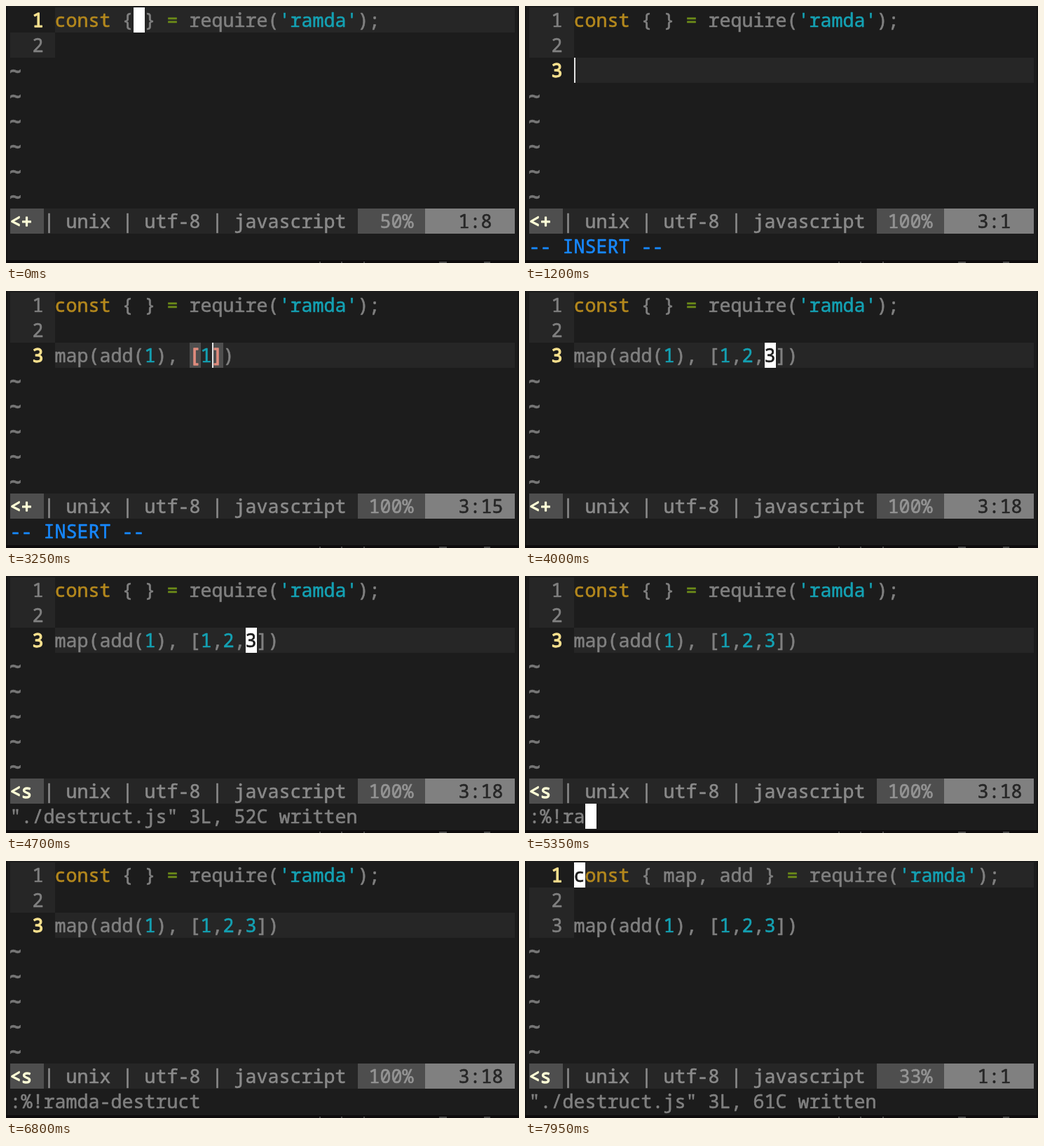
These frames come from a looping animation (732x368 px, 8000 ms). An HTML page with a canvas:

```html
<!DOCTYPE html>
<html lang="en">
<head>
<meta charset="utf-8">
<title>Editor session</title>
<style>
  html, body { margin: 0; width: 100%; height: 100%; overflow: hidden; background: #1c1c1c; }
  canvas { display: block; }
</style>
</head>
<body>
<canvas id="stage" width="732" height="368"></canvas>
<script>
const ctx = document.getElementById('stage').getContext('2d');
const LOOP = 8000;
const CW = 16, RH = 36, LEFT = 6, TOP = 2, COLS = 45, GUTTER = 4;
const FONT = '26.67px "Noto Sans Mono", "DejaVu Sans Mono", monospace';
const TILDE_FONT = 'bold 28px "DejaVu Sans Mono", monospace';
const REGULAR = 0.6, BOLD = 1.3;   // outline widths that thicken the glyphs

const C = {
  bg: '#1c1c1c', line: '#262626', text: '#808080', tilde: '#767676',
  keyword: '#b4881d', op: '#6b8a18', value: '#14a1b3',
  current: '#f7e08e', match: '#df8c7e', matchBg: '#4e4e4e',
  mode: '#ffffd7', panel: '#4e4e4e', panelText: '#949494',
  place: '#808080', insert: '#1787fb', white: '#ffffff'
};

// Key times in ms
const T = { down: 350, open: 700, esc: 4000, save: 4400, run: 6500, filtered: 7050, resave: 7750 };
const TYPED = 'map(add(1), [1,2,3';
const TYPED_AT = [1400, 1510, 1620, 1780, 1930, 2030, 2130, 2290, 2480,
                  2650, 2760, 2880, 3040, 3200, 3400, 3520, 3660, 3790];
const FILTER = ':%!ramda-destruct';
const FILTER_START = 5070, FILTER_STEP = 65;

const x = col => LEFT + col * CW;
const y = row => TOP + row * RH;

function box(col, row, cols, color) {
  ctx.fillStyle = color;
  ctx.fillRect(x(col), y(row), cols * CW, RH);
}

function put(str, col, row, color, weight = REGULAR, font = FONT) {
  ctx.font = font;
  ctx.fillStyle = ctx.strokeStyle = color;
  ctx.lineWidth = weight;
  [...str].forEach((ch, i) => {
    const cx = x(col + i) + CW / 2 - 0.5, base = y(row) + 28;
    ctx.fillText(ch, cx, base);
    ctx.strokeText(ch, cx, base);
  });
}

function putCode(str, row) {
  let col = GUTTER;
  for (const part of str.match(/const|'[^']*'|\d|=|[^\d='c]+|./g) || []) {
    const color = part === 'const' ? C.keyword
      : part === '=' ? C.op
      : /^['\d]/.test(part) ? C.value : C.text;
    put(part, col, row, color);
    col += part.length;
  }
}

// Auto-closed brackets still open after the typed text
function openBrackets(str) {
  const stack = [];
  [...str].forEach((ch, i) => {
    if ('(['.includes(ch)) stack.push(i);
    else if (')]'.includes(ch)) stack.pop();
  });
  return stack;
}

function stateAt(t) {
  const typed = TYPED.slice(0, TYPED_AT.filter(at => at <= t).length);
  const open = openBrackets(typed);
  const closers = open.map(i => typed[i] === '(' ? ')' : ']').reverse().join('');
  const done = t >= T.filtered;
  const s = {
    lines: [`const { ${done ? 'map, add ' : ''}} = require('ramda');`, ''],
    row: 0, col: 7, insert: t >= T.open && t < T.esc, match: [],
    saved: (t >= T.save && t < T.filtered) || t >= T.resave,
    message: '', command: false
  };
  if (t >= T.open) s.lines.push(typed + closers);
  if (t >= T.down) { s.row = 1; s.col = 0; }
  if (t >= T.open) { s.row = 2; s.col = typed.length - (t >= T.esc ? 1 : 0); }
  if (done) { s.row = 0; s.col = 0; }
  if (s.insert && open.length) s.match = [open[open.length - 1], typed.length];

  const prompt = str => { s.message = str; s.command = true; };
  if (s.insert) s.message = '-- INSERT --';
  else if (t >= T.resave) s.message = '"./destruct.js" 3L, 61C written';
  else if (t >= 7600) prompt(':w');
  else if (t >= 7450) prompt(':');
  else if (done) s.message = '3 lines filtered';
  else if (t >= FILTER_START) prompt(FILTER.slice(0, 1 + Math.floor((t - FILTER_START) / FILTER_STEP)));
  else if (t >= T.save) s.message = '"./destruct.js" 3L, 52C written';
  else if (t >= 4220) prompt(':w');
  else if (t >= 4120) prompt(':');
  s.running = t >= T.run && !done;
  return s;
}

function drawStatus(s) {
  const row = 8;
  box(0, row, COLS, C.line);
  box(0, row, 3, C.panel);
  box(31, row, 6, C.panel);
  box(37, row, 8, C.place);
  put(s.saved ? '<s' : '<+', 0, row, C.mode, BOLD);
  put('| unix | utf-8 | javascript', 3, row, '#8a8a8a');
  const percent = Math.floor((s.row + 1) / s.lines.length * 100) + '%';
  put(percent.padStart(4), 32, row, C.panelText);
  put(`${s.row + 1}:${s.col + 1}`, 40, row, C.line);
}

function drawCursor(s) {
  if (s.running) return;
  if (s.command) return box(s.message.length, 9, 1, C.white);
  const col = GUTTER + s.col;
  if (s.insert) {
    ctx.fillStyle = '#e4e4e4';
    ctx.fillRect(x(col), y(s.row), 2, RH);
  } else {
    box(col, s.row, 1, C.white);
    put(s.lines[s.row][s.col] || ' ', col, s.row, C.bg);
  }
}

function drawEdge() {
  ctx.fillStyle = '#141414';
  ctx.fillRect(0, 0, 2, 368);
  ctx.fillRect(730, 0, 2, 368);
  ctx.fillStyle = '#0e0c0d';
  ctx.fillRect(0, 364, 732, 4);
  ctx.fillStyle = '#4a4a4a';
  for (const [left, width] of [[447, 2], [478, 2], [510, 2], [618, 11], [682, 9]])
    ctx.fillRect(left, 366, width, 2);
}

function draw(t) {
  const s = stateAt(t);
  ctx.fillStyle = C.bg;
  ctx.fillRect(0, 0, 732, 368);
  for (let row = 0; row < 8; row++) {
    if (row >= s.lines.length) {
      put('~', 0, row, C.tilde, REGULAR, TILDE_FONT);
      continue;
    }
    const here = row === s.row;
    if (here) box(GUTTER, row, COLS - GUTTER, C.line);
    else box(0, row, GUTTER, C.line);
    put(String(row + 1), 2, row, here ? C.current : C.text, here ? BOLD : REGULAR);
    putCode(s.lines[row], row);
  }
  for (const i of s.match) {
    box(GUTTER + i, s.row, 1, C.matchBg);
    put(s.lines[s.row][i], GUTTER + i, s.row, C.match, BOLD);
  }
  drawStatus(s);
  put(s.message, 0, 9, s.insert ? C.insert : C.text);
  drawEdge();
  drawCursor(s);
}

ctx.textAlign = 'center';
ctx.lineJoin = 'round';
const start = performance.now();
function tick() {
  draw((performance.now() - start) % LOOP);
  requestAnimationFrame(tick);
}
tick();
</script>
</body>
</html>
```
